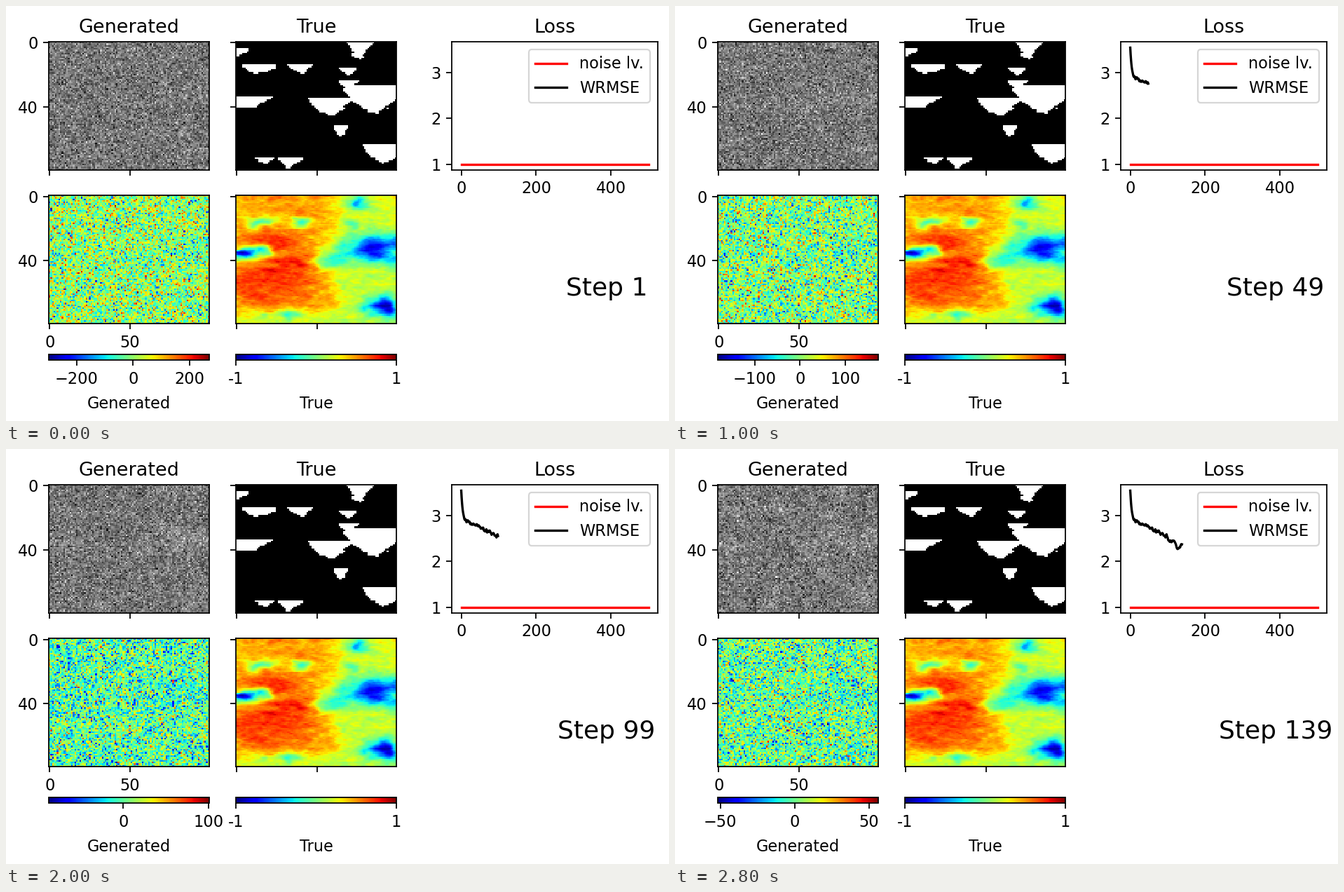
These frames come from a looping animation (946x592 px, 3 s). A matplotlib script:

```python
import numpy as np
import matplotlib.pyplot as plt
from matplotlib.animation import FuncAnimation

W, H, DPI = 946, 592, 160
COLS, ROWS = 100, 80
FRAMES, INTERVAL = 15, 200
LAST_STEP = 139

plt.rcParams["font.family"] = "DejaVu Sans"
plt.rcParams["font.size"] = 10.15

xx, yy = np.meshgrid(np.arange(COLS), np.arange(ROWS))
rng = np.random.default_rng(7)

# Flat-topped lenses: left, right, top, height, dip in the lower section
LENSES = [
    (-6, 6, 4, 6, .04), (68, 85, 0, 10, .34), (3, 26, 14, 5.5, .34),
    (33, 47, 14, 5, .32), (63, 76, 16, 4, .18), (64, 76, 24, 6, .02),
    (66, 106, 27, 17, .52), (44, 72, 35, 11, .30), (-12, 22, 34, 7, .74),
    (60, 69, 52, 6, .10), (78, 106, 64, 11, .56), (25, 41, 72, 6, .25),
    (11, 23, 72, 4, .13),
]
# Warm spots: column, row, column spread, row spread, height
WARM = [(20, 50, 23, 15, .15), (21, 29, 8, 4, .14),
        (38, 42, 9, 3.5, .09), (10, 60, 10, 4, .05)]


def smooth(a, nx, ny):
    """Box-blur twice over nx columns and ny rows."""
    for axis, n in ((1, nx), (0, ny)):
        pad = [(0, 0), (0, 0)]
        pad[axis] = (n, n)
        kernel = np.convolve(np.ones(n), np.ones(n)) / n ** 2
        wide = np.pad(a, pad, mode="edge")
        wide = np.apply_along_axis(np.convolve, axis, wide, kernel, "same")
        a = wide[:, n:-n] if axis else wide[n:-n]
    return a


def texture(nx, ny, std):
    a = smooth(rng.standard_normal((ROWS, COLS)), nx, ny)
    return a / a.std() * std


def sigmoid(t):
    return 1 / (1 + np.exp(-t))


def bump(x, y, cx, cy, sx, sy):
    return np.exp(-((x - cx) / sx) ** 2 / 2 - ((y - cy) / sy) ** 2 / 2)


def lens_mask():
    mask = np.zeros((ROWS, COLS))
    px, py = xx + texture(3, 2, .7), yy + texture(3, 2, .5)
    for x0, x1, top, height, _ in LENSES:
        u = (2 * px - x0 - x1) / (x1 - x0)
        depth = height * (1 - np.abs(u) ** 1.7)
        mask[(yy >= top) & (py < top + depth)] = 1
    return mask


def section():
    px, py = xx + texture(7, 4, 1.6), yy + texture(7, 4, .8)
    right = sigmoid((px - 61) / 4)
    f = .74 - .05 * py / ROWS - .12 * right
    f -= .10 * sigmoid((py - 72) / 1.5) * (1 - right)
    for cx, cy, sx, sy, h in WARM:
        f += h * bump(px, py, cx, cy, sx, sy)
    for x0, x1, top, height, dip in LENSES:
        f -= dip * bump(px, py, (x0 + x1) / 2, top + .35 * height,
                        .28 * (x1 - x0), .3 * height + .7)
    f += texture(5, 2, .02) + texture(2, 1, .014)
    return np.clip(f, .04, .97) * 2 - 1


def loss_curve(s):
    trend = 2.88 + .66 * np.exp(-s / 4) - .62 * (s / LAST_STEP) ** 1.5
    swing = .1 * (s / LAST_STEP) ** 3 * np.sin(2 * np.pi * (s - 110) / 22)
    jitter = np.convolve(rng.normal(0, .035, len(s)), [.3, .4, .3], "same")
    return trend + swing + jitter * np.clip(s / 15, 0, 1)


mask = lens_mask()
truth = section()
soft = smooth(mask, 4, 3)
steps = np.arange(LAST_STEP)
loss = loss_curve(steps)

fig = plt.figure(figsize=(W / DPI, H / DPI), dpi=DPI, facecolor="white")


def panel(left, top, width, height):
    return fig.add_axes([left / W, 1 - (top + height) / H,
                         width / W, height / H])


def image(left, top, data, cmap, lo, hi, xlab=False, ylab=False):
    ax = panel(left, top, 228.5, 182.8)
    im = ax.imshow(data, cmap=cmap, vmin=lo, vmax=hi, aspect="auto",
                   interpolation="nearest")
    ax.set_xticks([0, 50])
    ax.set_yticks([0, 40])
    ax.tick_params(labelbottom=xlab, labelleft=ylab)
    return ax, im


def bar(im, left, label):
    cax = panel(left, 497.4, 228.5, 8)
    cb = fig.colorbar(im, cax=cax, orientation="horizontal")
    cb.set_label(label, labelpad=5.4)
    return cb


X1, X2, Y1, Y2 = 61.2, 328.3, 51.1, 270.4
blank = np.zeros((ROWS, COLS))
ax_g, grey_im = image(X1, Y1, blank, "gray", 0, 1, ylab=True)
ax_t, _ = image(X2, Y1, mask, "gray", 0, 1)
_, noise_im = image(X1, Y2, blank, "jet", -1, 1, xlab=True, ylab=True)
_, true_im = image(X2, Y2, truth, "jet", -1, 1)
ax_g.set_title("Generated")
ax_t.set_title("True")

bar(noise_im, X1, "Generated")
bar(true_im, X2, "True").set_ticks([-1, 1], labels=["-1", "1"])

ax_l = panel(636.2, Y1, 294, 182.8)
ax_l.set_title("Loss")
ax_l.plot([0, 500], [1, 1], color="red", label="noise lv.")
curve, = ax_l.plot([], [], color="black", label="WRMSE")
ax_l.set(xlim=(-25, 525), ylim=(.873, 3.667),
         xticks=[0, 200, 400], yticks=[1, 2, 3])
ax_l.legend(loc="upper right")

step_text = fig.text(857 / W, 1 - 413 / H, "", fontsize=16.2, ha="center",
                     va="baseline")


def update(i):
    step = max(1, 10 * i - 1)
    r = np.random.default_rng(100 + i)
    grain = r.standard_normal((2, ROWS, COLS))
    lift = .02 + .06 * step / LAST_STEP
    grey_im.set_data(np.clip(.46 + .13 * grain[0] + lift * soft, 0, 1))

    # The value range shrinks as training goes on, slightly off centre
    span = 284 * np.exp(-(step / 91) ** 1.2)
    skew = .07 * np.cos(2.9 * (i - 10))
    noise_im.set_data(span / 3.7 * (grain[1] - .3 * soft))
    noise_im.set_clim(-span * (1 - skew), span * (1 + skew))

    curve.set_data(steps[:step], loss[:step])
    step_text.set_text(f"Step {step}")
    return grey_im, noise_im, curve, step_text


anim = FuncAnimation(fig, update, frames=FRAMES, interval=INTERVAL,
                     repeat=True, repeat_delay=0, blit=False)
plt.show()
```
